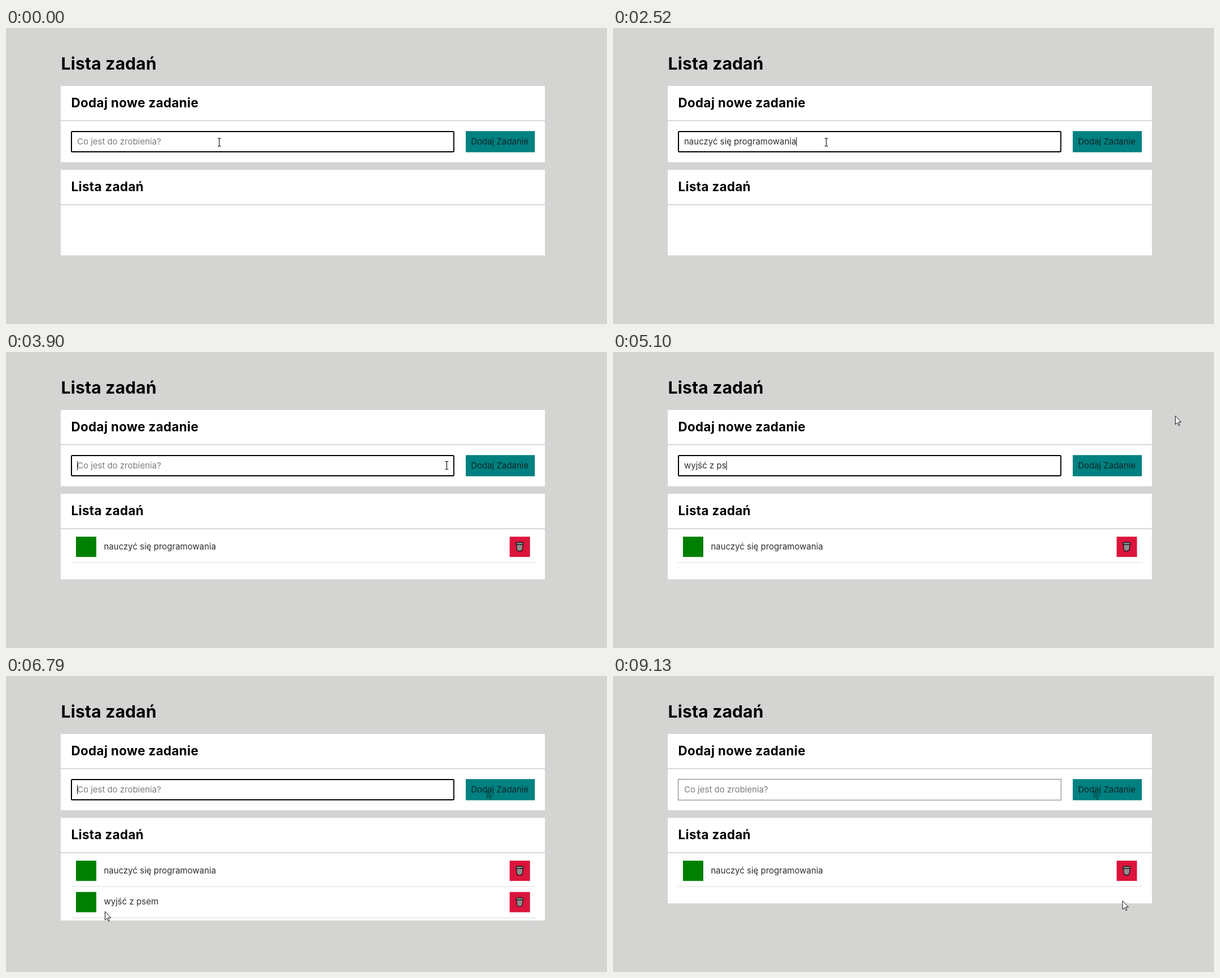
Recreate the animation shown at these times as an HTML page. Size 1065 px wide and 526 px high, loop 9.28 s.

```html
<!DOCTYPE html>
<html lang="pl">
<head>
<meta charset="utf-8">
<title>Lista zadań</title>
<style>
  html, body { margin: 0; width: 100%; height: 100%; overflow: hidden; background: #d4d4d2; }
  svg { display: block; width: 1065px; height: 526px; }
  text { font: 400 15px Inter, "Open Sans", sans-serif; fill: #2e2e2e; white-space: pre; }
  .h1 { font-size: 30px; font-weight: 700; letter-spacing: .2px; fill: #000; }
  .h2 { font-size: 22.4px; font-weight: 700; letter-spacing: .35px; fill: #000; }
  .hint { fill: #7c7c7c; }
  .label { fill: #0a2424; }
  .done text { text-decoration: line-through; }
  .tick { visibility: hidden; }
  .done .tick { visibility: visible; }
</style>
</head>
<body>
<svg viewBox="0 0 1065 526">
  <defs>
    <path id="arrow" d="M.5 .5V15.8L4 12.5L6.4 17.8L8.4 16.9L6.1 11.7H10.9Z"/>
    <pattern id="mesh" width="3" height="3" patternUnits="userSpaceOnUse" patternTransform="rotate(45)">
      <rect width="3" height="3" fill="#b4b4b4"/>
      <path d="M0 0H3M0 0V3" stroke="#444" stroke-width="1.2"/>
    </pattern>
    <g id="bin">
      <rect width="36" height="36" fill="#dc143c"/>
      <path d="M11.6 12.5L13.2 24.4Q17.7 26.8 22.2 24.4L23.8 12.5Z" fill="url(#mesh)" stroke="#111" stroke-width="1.2"/>
      <ellipse cx="17.7" cy="12" rx="7" ry="2.3" fill="#808080" stroke="#111" stroke-width="1.2"/>
    </g>
  </defs>

  <text class="h1" x="97.5" y="74">Lista zadań</text>

  <rect x="97" y="103" width="858" height="135.5" fill="#fff"/>
  <rect x="97" y="163.7" width="858" height="1.8" fill="#d3d3d3"/>
  <text class="h2" x="115.5" y="141">Dodaj nowe zadanie</text>
  <rect id="field" fill="#fff"/>
  <text id="hint" class="hint" x="126" y="207">Co jest do zrobienia?</text>
  <text id="entry" x="126" y="207" xml:space="preserve"></text>
  <rect id="caret" y="194" width="1" height="16"/>
  <rect x="814.7" y="183.2" width="122.4" height="37.6" fill="#008080"/>
  <use id="trail" href="#arrow" x="851.5" y="202" fill="#066" stroke="#055"/>
  <text class="label" x="824" y="207">Dodaj Zadanie</text>

  <rect id="card" x="97" y="252" width="858" fill="#fff"/>
  <rect x="97" y="313.2" width="858" height="1.8" fill="#d3d3d3"/>
  <text class="h2" x="115.5" y="290">Lista zadań</text>
  <g id="rows"></g>

  <circle id="press" r="11" fill="#8fd025" fill-opacity=".82"/>
  <g id="pointer">
    <use id="tip" href="#arrow" fill="#fff" stroke="#111"/>
    <path id="beam" d="M-3 -7H-1L0 -6L1 -7H3M0 -6V6M-3 7H-1L0 6L1 7H3" fill="none" stroke="#111" stroke-width="1.2"/>
  </g>
</svg>

<script>
const LOOP = 9280, TICK = 70, KEY = 58;
const TASKS = ["nauczyć się programowania", "wyjść z psem"];

// mouse down and up, one pair per click
const CLICKS = { add1: [3500, 3640], add2: [6050, 6170], check: [6980, 7130], remove: [8900, 9100] };
const [added1, added2, checked, removed] = Object.values(CLICKS).map(c => c[1]);

const HOME = { x: 378, y: 203 };
const MOVES = [
  { from: 2590, to: 3460, x: 894, y: 195, bow: 45 },
  { from: 3640, to: 3850, x: 781, y: 201.5 },
  { from: 4230, to: 4560, x: 996, y: 113 },
  { from: 5290, to: 5880, x: 894, y: 195 },
  { from: 6250, to: 6790, x: 175, y: 418 },
  { from: 6880, to: 6950, x: 151, y: 407 },
  { from: 7310, to: 8190, x: 838, y: 389, bow: 20 },
  { from: 8280, to: 8610, x: 902.5, y: 399 }
];

const $ = id => document.getElementById(id);
const clamp = (v, lo, hi) => Math.max(lo, Math.min(hi, v));
const during = (t, [a, b]) => t >= a && t < b;
const show = (el, on) => el.setAttribute("visibility", on ? "visible" : "hidden");
const set = (el, attrs) => { for (const k in attrs) el.setAttribute(k, attrs[k]); };

$("rows").innerHTML = TASKS.map((name, i) => `<g transform="translate(0 ${i * 55.6})">
  <rect x="124" y="328.2" width="36" height="36" fill="#008000"/>
  <path class="tick" d="M137.5 346.5L140.3 350.2L146 340.5" fill="none" stroke="#000" stroke-width="1.9"/>
  <text x="173.5" y="350.8">${name}</text>
  <use href="#bin" x="892.5" y="328.2"/>
  <rect x="115" y="373.5" width="823" height="1.3" fill="#e4e4e4"/>
</g>`).join("");
const rows = [...$("rows").children];

// characters struck since a start time
const keys = (t, start, max) => clamp(Math.floor((t - start) / KEY) + 1, 0, max);

function typed(t) {
  if (t < added1) return TASKS[0].slice(0, keys(t, 30, 6) + keys(t, 1390, 19));
  if (t < added2) return TASKS[1].slice(0, keys(t, 4570, 12));
  return "";
}

function pointerAt(t) {
  const now = Math.floor(t / TICK) * TICK;
  return MOVES.reduce((p, { from, to, x, y, bow = 0 }) => {
    const u = clamp((now - from) / (to - from), 0, 1);
    const k = u * u * (3 - 2 * u);
    return { x: p.x + (x - p.x) * k, y: p.y + (y - p.y) * k + bow * Math.sin(Math.PI * k) };
  }, HOME);
}

let lastText = null;
function render(t) {
  const pressed = Object.values(CLICKS).some(c => during(t, c));
  const focus = !pressed && t < checked;
  set($("field"), focus
    ? { x: 116, y: 184, width: 677.5, height: 36, rx: 1.5, stroke: "#000", "stroke-width": 2 }
    : { x: 115.5, y: 183.5, width: 678.5, height: 37, rx: 0, stroke: "#767676", "stroke-width": 1 });

  const text = typed(t);
  if (text !== lastText) {
    $("entry").textContent = lastText = text;
    $("caret").setAttribute("x", 126 + (text ? $("entry").getComputedTextLength() : 0));
  }
  show($("hint"), !text);
  show($("caret"), focus && t >= 30);

  const second = during(t, [added2, removed]);
  show(rows[0], t >= added1);
  show(rows[1], second);
  rows[1].classList.toggle("done", second && t >= checked);
  $("card").setAttribute("height", second ? 182.5 : 152);
  show($("trail"), t >= 6440);

  const { x, y } = pointerAt(t);
  const overField = during(x, [115, 794]) && during(y, [183, 221]);
  $("pointer").setAttribute("transform", `translate(${x} ${y})`);
  show($("beam"), overField);
  show($("tip"), !overField);
  set($("press"), { cx: x - 0.5, cy: y });
  show($("press"), pressed);
}

const start = performance.now();
function frame() {
  render((performance.now() - start) % LOOP);
  requestAnimationFrame(frame);
}
frame();
</script>
</body>
</html>
```
